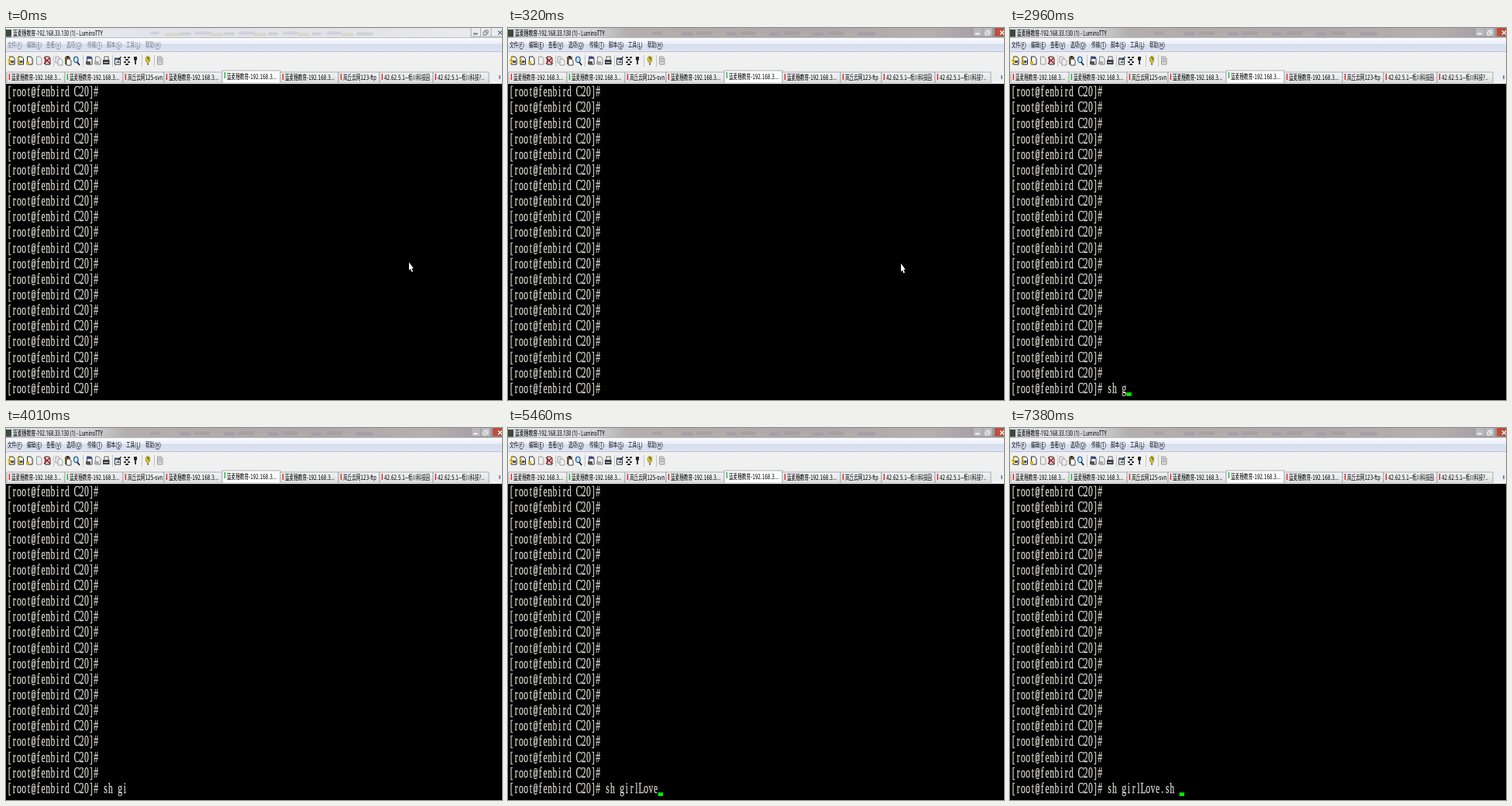
Write an HTML page that moves like this. It is 640 by 480 pixels and loops after 8000 ms.

```html
<!DOCTYPE html>
<html lang="zh">
<head>
<meta charset="utf-8">
<title>Terminal</title>
<style>
html, body { margin: 0; width: 100%; height: 100%; overflow: hidden; background: #000; }
svg { display: block; width: 640px; height: 480px; }
text { white-space: pre; }
.ui { font: 9px "DejaVu Sans", "Noto Sans CJK SC", "Noto Sans CJK", sans-serif; fill: #000; }
.title { font-family: "Noto Sans", "Noto Sans CJK SC", "Noto Sans CJK", sans-serif; font-size: 9.3px; }
.term { font: 18.5px "Liberation Serif", serif; fill: #dbd8d0; stroke: #dbd8d0; stroke-width: .3px; text-anchor: middle; }
.at { font: 16px "Liberation Mono", monospace; }
#menu text { fill: #10131c; }
.inactive #menu text { fill: #747b88; }
.inactive .focused, svg:not(.inactive) .blurred { display: none; }
</style>
</head>
<body>
<svg id="stage" viewBox="0 0 640 480">
  <defs>
    <linearGradient id="glassOn">
      <stop offset="0" stop-color="#d9dce0"/><stop offset=".17" stop-color="#d3d4d6"/>
      <stop offset=".24" stop-color="#b3afaf"/><stop offset=".62" stop-color="#aca7a8"/>
      <stop offset=".85" stop-color="#b5b0b0"/><stop offset="1" stop-color="#9d989b"/>
    </linearGradient>
    <linearGradient id="glassOff">
      <stop offset="0" stop-color="#eceff2"/><stop offset=".35" stop-color="#e1e2e8"/>
      <stop offset=".7" stop-color="#e2e3e6"/><stop offset="1" stop-color="#eaecf0"/>
    </linearGradient>
    <linearGradient id="menuBar" x2="0" y2="1">
      <stop offset="0" stop-color="#fdfdfe"/><stop offset=".45" stop-color="#e7ebf6"/>
      <stop offset=".45" stop-color="#d5dcec"/><stop offset="1" stop-color="#e0e5f4"/>
    </linearGradient>
    <linearGradient id="tabFill" x2="0" y2="1">
      <stop offset="0" stop-color="#f3f3f3"/><stop offset="1" stop-color="#dedfe1"/>
    </linearGradient>
  </defs>
  <g id="titleBar"></g>
  <g id="menu"></g>
  <g id="tools"></g>
  <g id="tabs"></g>
  <rect y="72" width="640" height="408"/>
  <g id="rows"></g>
  <rect id="cursor" y="470.3" width="6.4" height="4.6" fill="#00f000"/>
  <path id="mouse" d="M0 0V10.6L1.9 8.6 3.5 12.6 5 11.8 3.5 8H5.9Z" fill="#fff"/>
</svg>
<script>
const SQUEEZE = 0.625;   // the wide desktop is shown in a 4:3 picture
const CELL = 6.2, LINE = 20.13, LEFT = 1.5, BASE = 88.3;
const PROMPT = "[root@fenbird C20]#", COMMAND = "sh girlLove.sh ";
const LOOP = 8000;

const $ = id => document.getElementById(id);
const column = n => LEFT + CELL * n;
const label = (x, y, str, cls = "ui", attrs = "") =>
  `<text class="${cls}" transform="translate(${x} ${y}) scale(${SQUEEZE} 1)" ${attrs}>${str}</text>`;
const rect = (x, y, w, h, fill, attrs = "") =>
  `<rect x="${x}" y="${y}" width="${w}" height="${h}" fill="${fill}" ${attrs}/>`;
const line = (d, color, width = 1, fill = "none") =>
  `<path d="${d}" stroke="${color}" stroke-width="${width}" fill="${fill}"/>`;

// Faint shapes seen through the glass title bar
const smears = colors => Array.from({ length: 15 }, (_, i) =>
  rect(186 + i * 19, 4.5 + i * 2 % 3, 12 + i * 7 % 11, 4, colors[i % colors.length],
    'rx="2" opacity=".6"')).join("");

const windowButtons = (fill, ink, close) =>
  rect(600, 0, 12.5, 11, fill) + rect(613, 0, 11.5, 11, fill) + rect(628, 0, 12, 11, close) +
  line("M600 0V11H640M612.5 0V11M626 0V11", "#8e9095", .7) +
  rect(603, 6.5, 5.5, 2, ink) + line("M616 5H620V9H616ZM618 5V3H622V7H620", ink, 1) +
  line("M635 3.5L640 8.5M640 3.5L635 8.5", close === fill ? ink : "#fff", 1.3);

$("titleBar").innerHTML =
  `<g class="focused">${rect(0, 0, 640, 13, "url(#glassOn)")}${smears(["#a9969a", "#b8afa8", "#9d999f"])}
   ${windowButtons("#bbb8bb", "#f7f7f7", "#bd4e3c")}</g>
   <g class="blurred">${rect(0, 0, 640, 13, "url(#glassOff)")}${smears(["#c6c5d6", "#d2d1bd", "#c2c6c8"])}
   ${windowButtons("#e9ebef", "#73777e", "#e9ebef")}</g>` +
  rect(0, 12, 640, 1, "#b9bdc4") + rect(0, 2, 7, 9.5, "#3c4a3c") +
  label(9, 9.8, "蓝麦穗教育-192.168.33.130 (1) - LuminoTTY", "ui title");

const menus = [[2, "文件", "F"], [27, "编辑", "E"], [52, "查看", "V"], [78, "选项", "O"],
  [105, "传输", "T"], [130, "脚本", "S"], [155, "工具", "L"], [180, "帮助", "H"]];
$("menu").innerHTML = rect(0, 13, 640, 18, "url(#menuBar)") + rect(0, 30, 640, 1, "#bcc2d0") +
  menus.map(([x, name, key]) =>
    label(x, 25.3, `${name}(<tspan text-decoration="underline">${key}</tspan>)`)).join("");

// Toolbar pictures, each drawn around its own centre
const page = (x, y, fill = "#fff", ink = "#333") => line(`M${x} ${y}h4l2 2v6h-6z`, ink, .9, fill);
const sheet = (fill, ink) => line("M-2.5 -5H2L4 -2.5V5H-2.5Z", ink, 1, fill);
const session = sheet("#fff", "#222") + rect(-1, 0, 4, 3, "#555");
const icons = {
  quick: session + line("M-1 -5L-4 0H-1L-4 5", "#d9b000", 1.6),
  connect: session + line("M-4 -4L-1 -1M-4 3H0", "#d9b000", 2),
  tab: sheet("#fff", "#222") + rect(-4, 1, 4, 4, "#d6ad20"),
  reconnect: sheet("#eee", "#999"),
  drop: sheet("#ddd", "#222") + line("M-4 -4L4 4M4 -4L-4 4", "#b41c24", 1.6),
  copy: page(-4, -5, "#eee", "#999") + page(-1, -2, "#eee", "#999"),
  paste: rect(-4, -5, 7, 10, "#6e6234") + rect(-2, -6, 3, 2, "#222") + page(-2, -2),
  find: `<ellipse cx="-.7" cy="-1.2" rx="2.8" ry="3.8" fill="#bceaf5" stroke="#2350a4" stroke-width="1.2"/>` +
    line("M1 2L4 6", "#222", 1.7),
  screen: sheet("#fff", "#333") + rect(-3, -5, 7, 3, "#3a4f8c") + rect(-4, 1, 6, 4, "#555"),
  selection: sheet("#eee", "#888") + rect(-4, 1, 6, 4, "#aaa"),
  print: rect(-2, -5, 5, 5, "#fff", 'stroke="#333" stroke-width=".8"') + rect(-4, -1, 8.5, 6, "#3f4246") +
    rect(-2.5, 2, 5, 1, "#ddd"),
  options: rect(-4, -3, 7, 8, "#fff", 'stroke="#333"') + rect(-4, -3, 7, 2, "#345ea8") +
    line("M-2 2H2M0 0L4 -5", "#333", 1.3),
  keymap: line("M-4 -4H-1M1 -4H4M-2 -1H2M-4 2H-1M1 2H4M-2 5H2", "#333", 2),
  key: line("M0 -5V5", "#222", 1.7) + rect(-2, -5, 4, 4.5, "#222"),
  help: `<ellipse cy="-1.5" rx="2.7" ry="4" fill="#f3d92d" stroke="#75650b" stroke-width=".8"/>` +
    rect(-1, 3.5, 2, 2, "#75650b") + line("M-1 -3Q0 -5 1 -3L0 0", "#222", .9),
  list: sheet("#ddd", "#999") + line("M-1.5 -2H3M-1.5 1H3", "#888")
};
const iconX = [7, 18.5, 30, 42, 53, 68, 80, 91, 107, 118, 129, 144.5, 156, 167, 183, 198];
$("tools").innerHTML = rect(0, 31, 640, 24, "#f0f0f0") +
  [61, 99, 137, 175, 191].map(x => rect(x, 35, .8, 15, "#b9b9b9")).join("") +
  Object.values(icons).map((art, i) => `<g transform="translate(${iconX[i]} 42)">${art}</g>`).join("");

const RED = "#e02020", GREEN = "#18b030";
const local = "蓝麦穗教育-192.168.3...";
const tabs = [[1, RED, local], [76, GREEN, local], [151, RED, "岚丘云网125-svn"], [204, RED, local],
  [279, GREEN, local], [354, RED, local], [429, RED, "岚丘云网123-ftp"],
  [482, RED, "42.62.5.1--栎川科技园"], [551, RED, "42.62.5.1--栎川科技?.."], [623]];
$("tabs").innerHTML = rect(0, 55, 640, 17, "#eeeff0") +
  tabs.slice(0, -1).map(([x, color, name], i) => {
    const active = i === 4, top = active ? 55 : 57;
    return rect(x, top, tabs[i + 1][0] - x, 71 - top, active ? "#fff" : "url(#tabFill)",
        'stroke="#9a9da3" stroke-width=".8"') +
      rect(x + 2.7, top + 2, 1.4, 8, color) + label(x + 6, active ? 66.3 : 67.3, name);
  }).join("") + rect(0, 71, 640, 1, "#f4f4f4") + rect(636, 61, 2, 5, "#888aa8");

// Terminal letters sit centred in cells of equal width
const cells = n => Array.from({ length: n }, (_, i) => ((i + .5) * CELL / SQUEEZE).toFixed(2)).join(" ");
const termText = (col, row, str, length, id = "") =>
  label(column(col), BASE + LINE * row, str, "term", `x="${cells(length)}" ${id}`);
const prompt = PROMPT.replace("@", '<tspan class="at">@</tspan>');
$("rows").innerHTML =
  Array.from({ length: 20 }, (_, row) => termText(0, row, prompt, PROMPT.length)).join("") +
  termText(20, 19, "", COMMAND.length, 'id="typed"');

// [time, characters typed, cursor lit]
const keys = [[0, 0, 0], [380, 0, 1], [840, 0, 0], [1370, 0, 1], [1900, 0, 0], [2300, 2, 1],
  [2760, 3, 1], [2960, 4, 1], [3020, 5, 0], [3080, 5, 1], [4010, 5, 0], [4540, 5, 1], [5070, 5, 0],
  [5330, 8, 1], [5460, 11, 1], [6120, 11, 0], [6320, 12, 1], [6650, 13, 1], [6850, 14, 1],
  [7180, 14, 0], [7380, 15, 1]];

function draw(t) {
  const [, count, lit] = keys.findLast(([start]) => start <= t);
  $("typed").textContent = COMMAND.slice(0, count);
  $("cursor").setAttribute("x", column(20 + count));
  $("cursor").setAttribute("visibility", lit ? "visible" : "hidden");

  const step = Math.min(2, Math.floor(t / 60));
  $("mouse").setAttribute("transform", `translate(${520 - 6.5 * step} ${302.2 + .8 * step})`);
  $("mouse").setAttribute("visibility", t < 1370 ? "visible" : "hidden");
  $("stage").classList.toggle("inactive", t < 320);
}

function tick() {
  draw(performance.now() % LOOP);
  requestAnimationFrame(tick);
}
tick();
</script>
</body>
</html>
```
